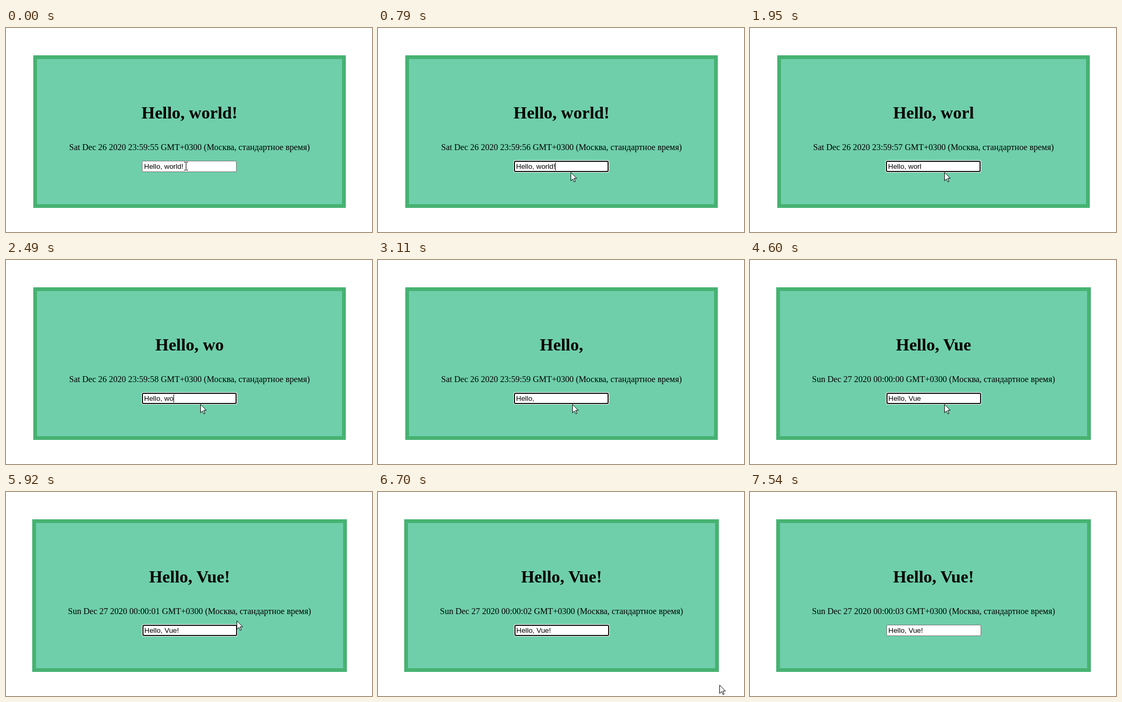
An HTML page for the animation above (7.71 s loop, 684 by 381 pixels).

```html
<!DOCTYPE html>
<html lang="en">
<head>
<meta charset="utf-8">
<title>Hello</title>
<style>
  html, body { margin: 0; width: 100%; height: 100%; overflow: hidden; background: #fff; }
  #stage { position: relative; width: 684px; height: 381px; overflow: hidden; color: #000; }
  #stage > * { position: absolute; margin: 0; box-sizing: border-box; white-space: pre; }
  #card { left: 51px; top: 51px; width: 584px; height: 285px; background: #6fcfab; border: 7px solid #47b272; }
  h1, p { left: 0; width: 686px; text-align: center; font-family: "Liberation Serif", "Times New Roman", serif; }
  h1 { top: 140px; font-size: 32px; line-height: 36px; }
  p { top: 214px; font-size: 16px; line-height: 17px; }
  #field { left: 254px; top: 248px; width: 177px; height: 21px; background: #fff; border: 1px solid #767676; border-radius: 2px; }
  #typed { left: 258px; top: 251px; height: 15px; font: 13.333px/15px "Liberation Sans", Arial, sans-serif; }
  #caret { position: absolute; top: 0; width: 1px; height: 15px; background: #000; }
  .next-day #card { left: 49px; width: 588px; }
  .next-day #field { left: 255px; }
  .next-day #typed { left: 258.5px; }
  .focused #field { border: 2px solid #101010; border-radius: 3px; box-shadow: 0 0 0 1px #fff; }
  svg { left: 0; top: 0; overflow: visible; }
</style>
</head>
<body>
<div id="stage">
  <div id="card"></div>
  <h1 id="title"></h1>
  <p id="clock"></p>
  <div id="field"></div>
  <div id="typed"><span id="value"></span><span id="caret"></span></div>
  <svg id="pointer" width="12" height="19">
    <path id="arrow" d="M.5 .7V16.3L4.1 12.9 6.7 18.5 8.9 17.5 6.4 11.8H11.3Z" fill="#fff" stroke="#000"/>
    <path id="beam" d="M-3 -7.5H0M1 -7.5H4M.5 -7V7M-3 7.5H0M1 7.5H4" fill="none" stroke="#000"/>
  </svg>
</div>
<script>
  const LOOP = 7710, FOCUS = 390, BLUR = 7540, MIDNIGHT = 4060;
  const ticks = [70, 1110, 2100, 3110, MIDNIGHT, 5060, 6010, 7010];

  const edits = [
    [0, 'world!'], [1710, 'world'], [1950, 'worl'], [2100, 'wor'], [2330, 'wo'],
    [2560, 'w'], [2720, ''], [3660, 'V'], [3890, 'Vu'], [MIDNIGHT, 'Vue'], [5060, 'Vue!']
  ];

  const caretShown = [
    [FOCUS, 940], [1480, 1950], [2490, 3040], [3570, 4600],
    [5060, 5610], [6150, 6700], [7160, BLUR]
  ];

  // time, shape, x, y
  const moves = [
    [0, 'beam', 336, 258], [390, 'beam', 326, 253], [530, 'beam', 342, 261],
    [700, 'beam', 351, 265], [790, 'arrow', 360, 269], [870, 'arrow', 362, 269],
    [940, 'arrow', 363, 269], [5690, 'arrow', 368, 269], [5770, 'beam', 385, 262],
    [5840, 'beam', 409, 253], [5920, 'arrow', 431, 240], [6010, 'beam', 488, 224],
    [6080, 'arrow', 577, 313], [6150, 'arrow', 638, 360], [6930, 'arrow', 640, 369],
    [7010, 'none', 0, 0]
  ];

  const el = id => document.getElementById(id);
  const latest = (list, t) => list.filter(item => item[0] <= t).pop();
  const show = (id, on) => { el(id).style.visibility = on ? 'visible' : 'hidden'; };
  const setText = (id, text) => {
    if (el(id).textContent !== text) el(id).textContent = text;
  };

  function dateText(t) {
    const second = 55 + ticks.filter(tick => tick <= t).length;
    const time = second < 60 ? `Sat Dec 26 2020 23:59:${second}` : `Sun Dec 27 2020 00:00:0${second - 60}`;
    return `${time} GMT+0300 (Москва, стандартное время)`;
  }

  function render(t) {
    const value = 'Hello, ' + latest(edits, t)[1];
    setText('title', value.trim());
    setText('value', value);
    setText('clock', dateText(t));

    el('stage').classList.toggle('focused', t >= FOCUS && t < BLUR);
    el('stage').classList.toggle('next-day', t >= MIDNIGHT);
    show('caret', caretShown.some(([from, to]) => t >= from && t < to));

    const [, shape, x, y] = latest(moves, t);
    el('pointer').style.transform = `translate(${x}px, ${y}px)`;
    show('arrow', shape === 'arrow');
    show('beam', shape === 'beam');
  }

  function frame() {
    render(performance.now() % LOOP);
    requestAnimationFrame(frame);
  }
  frame();
</script>
</body>
</html>
```
